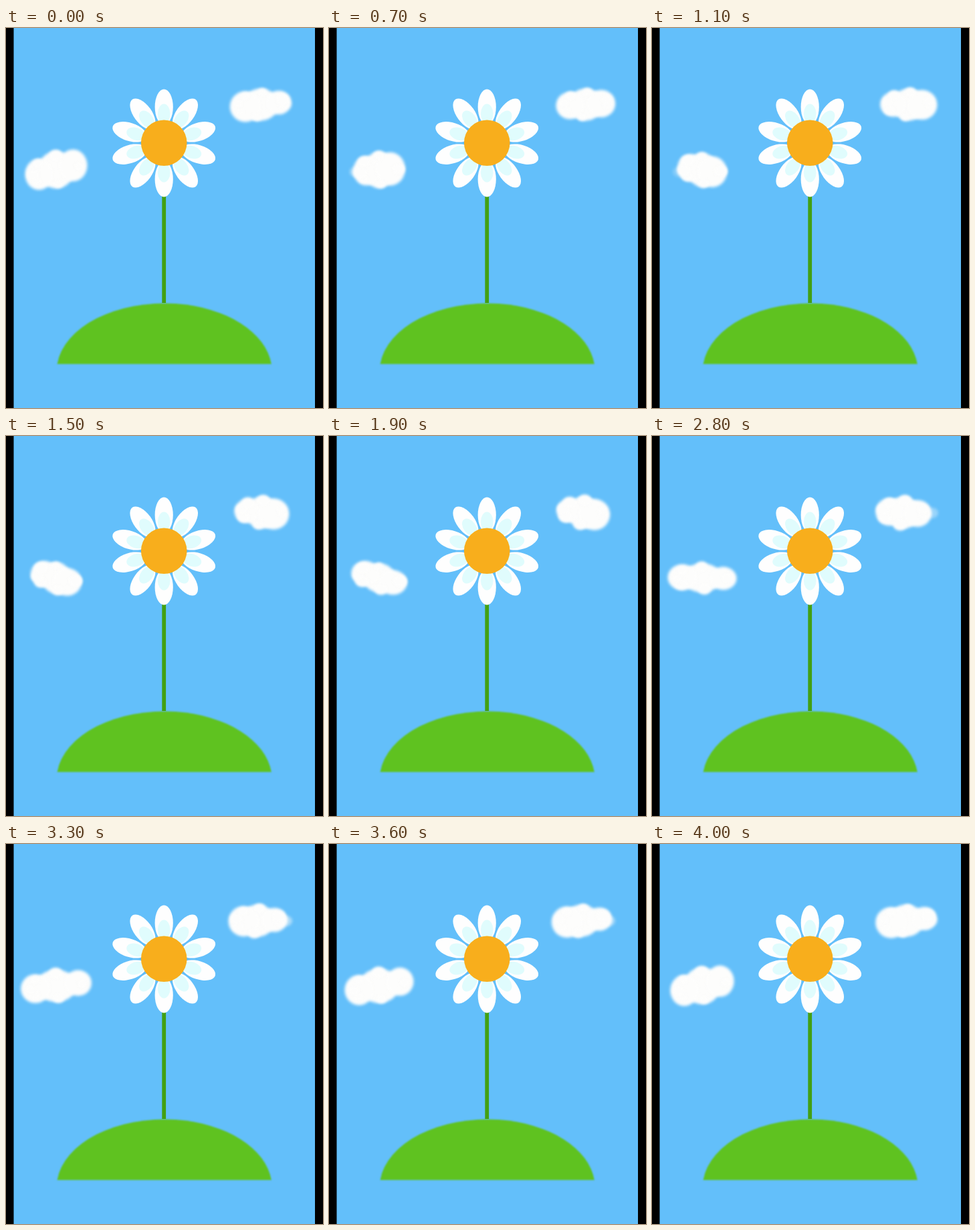
Recreate the animation shown at these times as an HTML page with a canvas. Size 474x568 px, loop 4100 ms.

```html
<!DOCTYPE html>
<html lang="en">
<head>
<meta charset="utf-8">
<title>Daisy</title>
<style>
  html, body { margin: 0; width: 100%; height: 100%; overflow: hidden; background: #000; }
  canvas { display: block; }
</style>
</head>
<body>
<canvas id="stage" width="474" height="568"></canvas>
<script>
const ctx = document.getElementById('stage').getContext('2d');
const LOOP = 4100, STEP = 100, TAU = Math.PI * 2;
const WHITE = '#fdfdfc';

// A slow swing between -1 and 1 that is highest at the given moment.
const swing = (t, peak) => Math.cos((t - peak) / LOOP * TAU);

function seeded(seed) {
  return () => {
    seed = (seed * 16807) % 2147483647;
    return seed / 2147483647;
  };
}

function ellipse(x, y, rx, ry, color) {
  ctx.fillStyle = color;
  ctx.beginPath();
  ctx.ellipse(x, y, rx, ry, 0, 0, TAU);
  ctx.fill();
}

function leftCloud(t) {
  return {
    x: 75, y: 212,
    width: 45 + 8 * swing(t, 3200),
    height: 26 + 4 * swing(t, 300),
    tilt: -7 * swing(t, 3900),
    bias: 0.05 * swing(t, 900),
    wisp: { x: 41, y: 215, alpha: 0.5 * swing(t, 400) },
    seed: 71
  };
}

function rightCloud(t) {
  return {
    x: 380 + 4 * swing(t, 900), y: 114.5,
    width: 43 + 3 * swing(t, 0),
    height: 25.5,
    tilt: -3 * swing(t, 0),
    bias: 0.12 * swing(t, 1700),
    wisp: { x: 418, y: 115, alpha: 0.5 * swing(t, 3300) },
    seed: 1907
  };
}

// A middle lobe, two side lobes and small puffs along the rim.
function drawCloud({ x, y, width, height, tilt, bias, wisp, seed }, t) {
  ctx.globalAlpha = Math.max(0, wisp.alpha);
  ellipse(wisp.x, wisp.y, 10, 8, WHITE);
  ctx.globalAlpha = 1;

  ellipse(x, y, width * 0.58, height * 0.94, WHITE);
  for (const side of [-1, 1]) {
    const rx = 21 * (1 + side * bias);
    const ry = height * (0.8 + side * bias);
    ellipse(x + side * (width - rx), y + side * tilt, rx, ry, WHITE);
  }

  const random = seeded(seed), puffs = 7;
  for (let i = 0; i < puffs; i++) {
    const a = (i + random()) / puffs * TAU;
    const r = 7 + 1.5 * swing(t, random() * LOOP);
    const px = Math.cos(a) * 0.74;
    ellipse(x + px * width, y + px * tilt + Math.sin(a) * 0.74 * height, r * 1.2, r, WHITE);
  }
}

function drawHill() {
  const bottom = 502.3, cy = 513, ry = 101.5;
  const cut = Math.asin((cy - bottom) / ry);
  ctx.fillStyle = '#5fc220';
  ctx.beginPath();
  ctx.ellipse(236.7, cy, 161, ry, 0, Math.PI + cut, TAU - cut);
  ctx.fill();
}

function drawFlower() {
  ctx.fillStyle = '#43a012';
  ctx.fillRect(233.3, 250, 5.8, 161);
  ctx.save();
  ctx.translate(236.2, 172);
  for (let i = 0; i < 10; i++) {
    ellipse(0, -54, 13.6, 26.5, '#fefefe');
    ellipse(0, -44, 9.3, 14.5, '#e0fcfd');
    ctx.rotate(TAU / 10);
  }
  ellipse(0, -0.3, 34.3, 34.3, '#f8ae1c');
  ctx.restore();
}

function draw(now) {
  const t = Math.floor((now % LOOP) / STEP) * STEP;
  ctx.filter = 'none';
  ctx.fillStyle = '#000';
  ctx.fillRect(0, 0, 474, 568);
  ctx.fillStyle = '#63bffa';
  ctx.fillRect(11.5, 0, 450.5, 568);

  ctx.filter = 'blur(2px)';
  drawCloud(leftCloud(t), t);
  drawCloud(rightCloud(t), t);
  ctx.filter = 'blur(0.9px)';
  drawHill();
  ctx.filter = 'blur(0.5px)';
  drawFlower();
}

let start;
function tick(now) {
  start ??= now;
  draw(Math.max(0, now - start));
  requestAnimationFrame(tick);
}
draw(0);
requestAnimationFrame(tick);
</script>
</body>
</html>
```
